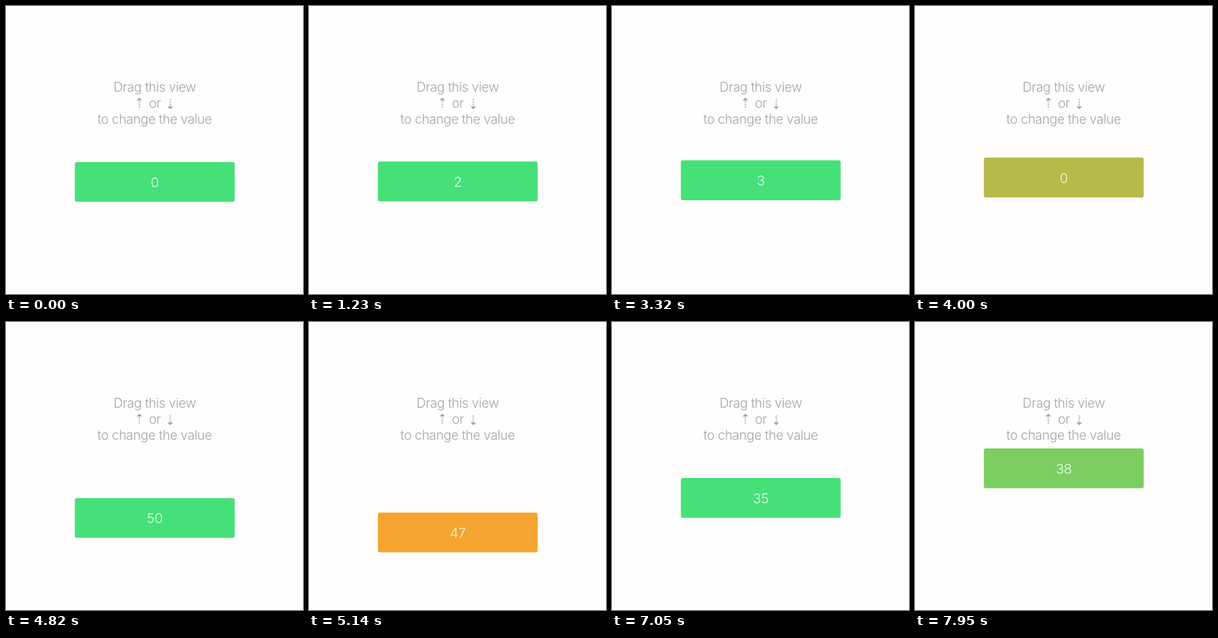
Recreate the animation shown at these times as an HTML page. Size 480 by 467 pixels, loop 8 s.

```html
<!DOCTYPE html>
<html lang="en">
<head>
<meta charset="utf-8">
<title>Drag to change the value</title>
<style>
  html, body { margin: 0; width: 100%; height: 100%; overflow: hidden; background: #fffdfe; }
  svg { display: block; width: 480px; height: 467px; }
  text { font: 300 21px Inter, Roboto, sans-serif; letter-spacing: -.018em; text-anchor: middle; fill: #a6a5a6; }
  #value { font-size: 22px; fill: #fff; fill-opacity: .88; }
  .arrow { fill: #a6a5a6; stroke: #a6a5a6; }
  .arrow line { stroke-width: 2; stroke-dasharray: 2 2; }
  .arrow path { stroke: none; }
</style>
</head>
<body>
<svg viewBox="0 0 480 467">
  <defs>
    <g id="arrow" class="arrow">
      <path d="M0 -9.5 L4.6 -4.8 H-4.6 Z"/>
      <line y1="-3.5" y2="8.5"/>
    </g>
  </defs>
  <text x="240.4" y="139.2">Drag this view</text>
  <use href="#arrow" x="215.5" y="158"/>
  <text x="240.6" y="165.2">or</text>
  <use href="#arrow" transform="translate(265.5 158) scale(1 -1)"/>
  <text x="240.3" y="191">to change the value</text>
  <g id="slider">
    <rect id="box" x="111.3" y="253" width="258.3" height="64.6" rx="3.5"/>
    <text id="value" x="240.4" y="294">0</text>
  </g>
</svg>
<script>
  const LOOP = 8000, VALUES = 51;
  const GREEN = [70, 224, 120], ORANGE = [245, 165, 47];
  const slider = document.getElementById('slider');
  const box = document.getElementById('box');
  const value = document.getElementById('value');

  // Times in ms. `reach` is the drag distance in px (up is negative), `rise` the time to get there,
  // `count` the number of value changes, `settle` a slow return in place of the spring.
  const drags = [
    { start: 30, release: 120, reach: -6 },
    { start: 530, release: 950, reach: -16, rise: 300 },
    { start: 1840, release: 1940, reach: -10 },
    { start: 2400, release: 2550, reach: -18, rise: 110 },
    { start: 3120, release: 3220, reach: 19 },
    { start: 3740, release: 3900, reach: 51.5, rise: 130, count: 3, tick: 45 },
    { start: 4700, release: 6390, reach: 56, rise: 220, count: 16, settle: 620 },
    { start: 7200, release: 8100, reach: -48.5, rise: 800, count: 3, tick: 220 }
  ].map(drag => ({ rise: 90, count: 1, tick: 98, ...drag }));

  const clamp = x => Math.min(1, Math.max(0, x));
  const ease = p => (1 - Math.cos(Math.PI * clamp(p))) / 2;
  const spring = ms => Math.exp(-0.009 * ms) * Math.cos(Math.PI * ms / 165);

  function offsetAt({ start, release, reach, rise, settle }, t) {
    const since = t - release;
    if (since < 0) return reach * ease((t - start) / rise);
    return reach * (settle ? 1 - ease(since / settle) : spring(since));
  }

  // The box turns orange near the limit and fades back once released.
  function tintAt(drag, t) {
    const held = offsetAt(drag, Math.min(t, drag.release - 1));
    return clamp((Math.abs(held) - 46.5) / 5) * (1 - clamp((t - drag.release) / 280));
  }

  function valueAt(t) {
    const total = drags.reduce((sum, { start, reach, count, tick }) => {
      const ticks = Math.floor(Math.max(0, t - start) / tick);
      return sum - Math.sign(reach) * Math.min(count, ticks);
    }, 0);
    return (total + VALUES) % VALUES;
  }

  function draw(t) {
    const drag = drags.filter(d => d.start <= t).pop() || drags[0];
    const tint = tintAt(drag, t);
    const color = GREEN.map((c, i) => Math.round(c + (ORANGE[i] - c) * tint));
    slider.setAttribute('transform', `translate(0 ${offsetAt(drag, t).toFixed(2)})`);
    box.setAttribute('fill', `rgb(${color})`);
    value.textContent = valueAt(t);
  }

  const start = performance.now();
  function frame() {
    draw((performance.now() - start) % LOOP);
    requestAnimationFrame(frame);
  }
  frame();
</script>
</body>
</html>
```
